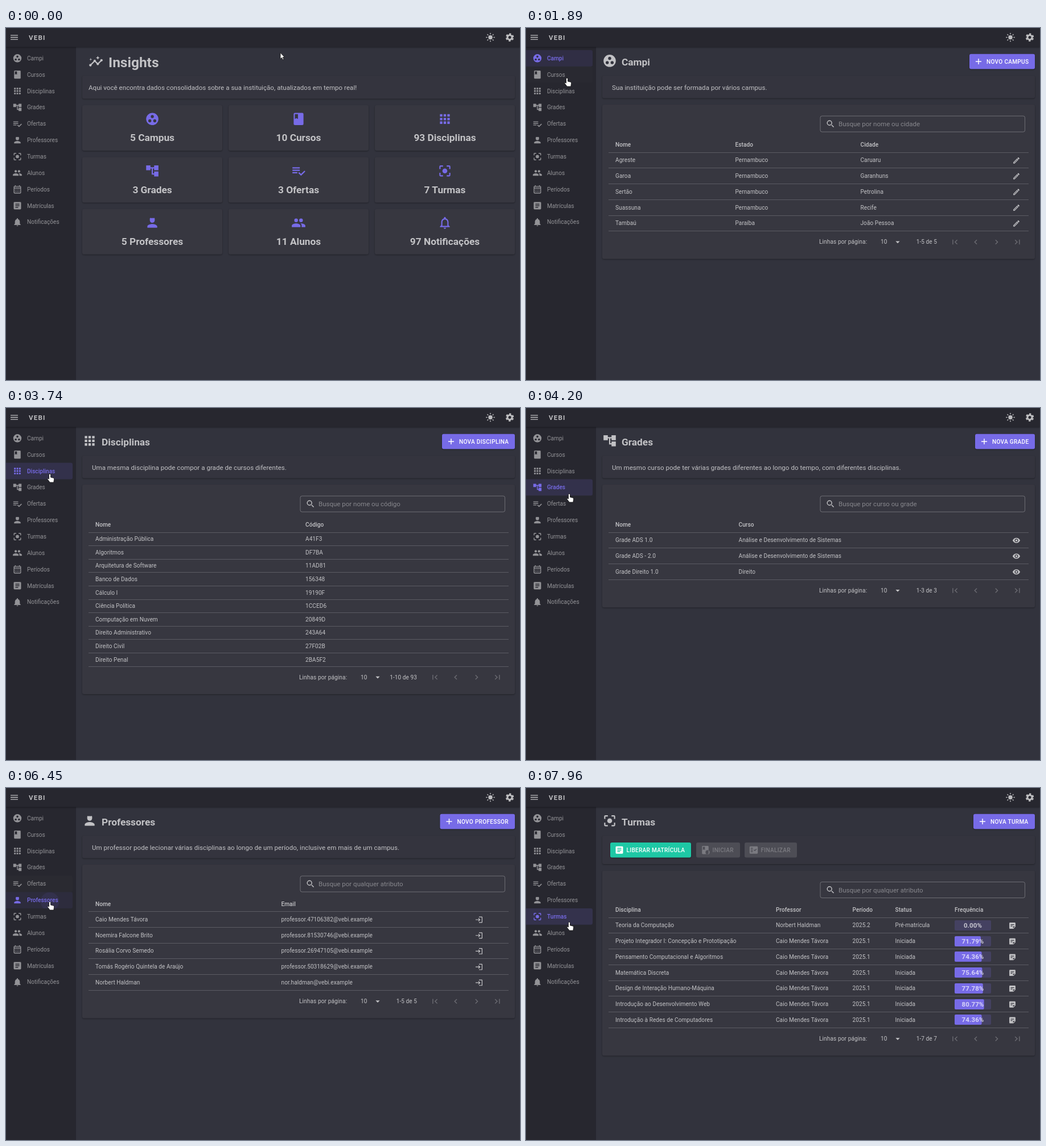
Animation of 903 by 620 pixels, one loop 8000 ms. Source, as an HTML page:

```html
<!DOCTYPE html>
<html lang="pt">
<head>
<meta charset="utf-8">
<style>
html, body { margin: 0; width: 100%; height: 100%; overflow: hidden; background: #32333d; }
svg { display: block; }
text { font-family: Roboto, sans-serif; white-space: pre; }
.card { filter: drop-shadow(0 1px 1px rgba(0, 0, 0, .35)); }
</style>
</head>
<body>
<svg id="stage" width="903" height="620" viewBox="0 0 903 620"></svg>
<script>
const LOOP = 8000;
const INK = 'rgba(255,255,255,.7)', DIM = 'rgba(255,255,255,.5)', FAINT = 'rgba(255,255,255,.26)';
const LINE = 'rgba(255,255,255,.18)', PRIMARY = '#776be7', SURFACE = '#373740', BAR = '#27272f';

const dot = (x, y, r) => `M${x - r} ${y}a${r} ${r} 0 1 0 ${2 * r} 0a${r} ${r} 0 1 0 ${-2 * r} 0z`;
const square = (x, y, s) => `M${x} ${y}h${s}v${s}h${-s}z`;
const three = [0, 1, 2];
const book = 'M18 2H6q-2 0-2 2v16q0 2 2 2h12q2 0 2-2V4q0-2-2-2zM6 4h5v8l-2.5-1.5L6 12z';
const bell = 'M12 22q2 0 2-2h-4q0 2 2 2zm6-6v-5c0-3.07-1.64-5.64-4.5-6.32V4a1.5 1.5 0 0 0-3 0v.68C7.63 5.36 6 7.92 6 11v5l-2 2v1h16v-1z';

const ICONS = {
  campus: dot(12, 12, 10) + dot(12, 8, 2.5) + dot(8, 15, 2.5) + dot(16, 15, 2.5),
  book,
  apps: three.flatMap(i => three.map(j => square(4 + 6 * i, 4 + 6 * j, 4))).join(''),
  tree: 'M22 11V3h-7v3H9V3H2v8h7V8h2v10h4v3h7v-8h-7v3h-2V8h2v3z',
  list: 'M14 10H2v2h12zm0-4H2v2h12zM2 16h8v-2H2zm19.5-4.5L23 13l-7 7-4.5-4.5L13 14l3 3z',
  teacher: 'M12 12a4 4 0 0 0 4-4V5.5a1.5 1.5 0 0 0-2.75-.83 1.5 1.5 0 0 0-2.5 0A1.5 1.5 0 0 0 8 5.5V8a4 4 0 0 0 4 4zm0 2c-2.67 0-8 1.34-8 4v2h16v-2c0-2.66-5.33-4-8-4z',
  focus: dot(12, 12, 4) + 'M5 15H3v4q0 2 2 2h4v-2H5zM5 5h4V3H5q-2 0-2 2v4h2zm14-2h-4v2h4v4h2V5q0-2-2-2zm0 16h-4v2h4q2 0 2-2v-4h-2z',
  people: dot(16, 8, 3) + dot(8, 8, 3) + 'M8 13c-2.33 0-7 1.17-7 3.5V19h14v-2.5c0-2.33-4.67-3.5-7-3.5zm8 0-1 .05c1.2.84 2 1.97 2 3.45V19h6v-2.5c0-2.33-4.67-3.5-7-3.5z',
  calendar: 'M19 4h-1V2h-2v2H8V2H6v2H5q-2 0-2 2v14q0 2 2 2h14q2 0 2-2V6q0-2-2-2zm0 16H5V10h14zm0-12H5V6h14z' +
    [7, 11, 15].map(x => square(x, 12, 2) + square(x, 16, 2)).join(''),
  article: 'M19 3H5q-2 0-2 2v14q0 2 2 2h14q2 0 2-2V5q0-2-2-2zm-5 14H7v-2h7zm3-4H7v-2h10zm0-4H7V7h10z',
  bell,
  bellLine: bell + 'M16 17H8v-6c0-2.48 1.51-4.5 4-4.5s4 2.02 4 4.5z',
  insights: 'M21 8c-1.45 0-2.26 1.44-1.93 2.51l-3.55 3.56h-1.04l-2.55-2.55C12.27 10.45 11.46 9 10 9s-2.27 1.44-1.93 2.52l-4.56 4.55C2.44 15.74 1 16.55 1 18a2 2 0 0 0 2 2c1.45 0 2.26-1.44 1.93-2.51l4.55-4.56h1.04l2.55 2.55C12.73 16.55 13.54 18 15 18s2.27-1.44 1.93-2.52l3.56-3.55C21.56 12.26 23 11.45 23 10a2 2 0 0 0-2-2zM15 9l.94-2.07L18 6l-2.06-.93L15 3l-.92 2.07L12 6l2.08.93zM3.5 11 4 9l2-.5L4 8l-.5-2L3 8l-2 .5L3 9z',
  menu: 'M3 18h18v-2H3zm0-5h18v-2H3zm0-7v2h18V6z',
  plus: 'M19 13h-6v6h-2v-6H5v-2h6V5h2v6h6z',
  search: dot(9.5, 9.5, 6.5) + dot(9.5, 9.5, 4.5) + 'M14 15.5l5 5 1.5-1.5-5-5z',
  edit: 'M14.06 9.02l.92.92L5.92 19H5v-.92zM17.66 3q-.4 0-.7.29l-1.83 1.83 3.75 3.75 1.83-1.83q.6-.7 0-1.41l-2.34-2.34q-.3-.29-.71-.29zm-3.6 3.19L3 17.25V21h3.75L17.81 9.94z',
  eye: 'M12 4.5C7 4.5 2.73 7.61 1 12c1.73 4.39 6 7.5 11 7.5s9.27-3.11 11-7.5c-1.73-4.39-6-7.5-11-7.5z' + dot(12, 12, 5) + dot(12, 12, 3),
  enter: 'M11 7 9.6 8.4l2.6 2.6H2v2h10.2l-2.6 2.6L11 17l5-5zm9 12h-8v2h8q2 0 2-2V5q0-2-2-2h-8v2h8z',
  note: 'M19 3H5q-2 0-2 2v14q0 2 2 2h10l6-6V5q0-2-2-2zM7 8h10v2H7zm5 6H7v-2h5zm2 5.5V14h5.5z',
  start: book + dot(17.5, 17.5, 5),
  check: 'M20 3H4q-2 0-2 2v14q0 2 2 2h16q2 0 2-2V5q0-2-2-2zM10 17H5v-2h5zm0-4H5v-2h5zm0-4H5V7h5zm4.8 6L12 12.2l1.4-1.4 1.4 1.4L18 9l1.4 1.4z',
  down: 'M7 10l5 5 5-5z',
  first: 'M18.4 16.6 13.8 12l4.6-4.6L17 6l-6 6 6 6zM6 6h2v12H6z',
  prev: 'M15.4 7.4 14 6l-6 6 6 6 1.4-1.4-4.6-4.6z',
  next: 'M10 6 8.6 7.4l4.6 4.6-4.6 4.6L10 18l6-6z',
  last: 'M5.6 7.4l4.6 4.6-4.6 4.6L7 18l6-6-6-6zM16 6h2v12h-2z'
};

const icon = (name, x, y, fill = INK, scale = .72) =>
  `<path d="${ICONS[name]}" fill="${fill}" fill-rule="evenodd" transform="translate(${x} ${y}) scale(${scale}) translate(-12 -12)"/>`;
// y is the middle of the capital letters
const text = (x, y, str, { size = 10.08, weight = 400, fill = INK, anchor = 'start', gap = '.006em' } = {}) =>
  `<text x="${x}" y="${y + size * .355}" font-size="${size}" font-weight="${weight}" fill="${fill}" text-anchor="${anchor}" letter-spacing="${gap}">${str}</text>`;
const lead = (x, str) => text(x, 104.7, str, { size: 11.52, gap: '.004em' });
const rect = (x, y, w, h, fill, extra = '') =>
  `<rect x="${x}" y="${y}" width="${w}" height="${h}" fill="${fill}" ${extra}/>`;
const card = (x, y, w, h, fill = SURFACE) => rect(x, y, w, h, fill, 'rx="3" class="card"');
const button = (x, y, w, name, label, fill, ink = '#fff') =>
  (ink === FAINT ? rect(x, y, w, 26.4, fill, 'rx="3"') : card(x, y, w, 26.4, fill)) +
  icon(name, x + 16, y + 13.2, ink) + text(x + (name === 'plus' ? 30 : 28.5), y + 13.2, label, { weight: 500, fill: ink, gap: '.0286em' });

const NAV = [
  ['campus', 'Campi'], ['book', 'Cursos'], ['apps', 'Disciplinas'], ['tree', 'Grades'],
  ['list', 'Ofertas'], ['teacher', 'Professores'], ['focus', 'Turmas'], ['people', 'Alunos'],
  ['calendar', 'Períodos'], ['article', 'Matrículas'], ['bell', 'Notificações']
];
const TOTALS = [
  ['campus', '5 Campus'], ['book', '10 Cursos'], ['apps', '93 Disciplinas'],
  ['tree', '3 Grades'], ['list', '3 Ofertas'], ['focus', '7 Turmas'],
  ['teacher', '5 Professores'], ['people', '11 Alunos'], ['bellLine', '97 Notificações']
];

const ADS = 'Análise e Desenvolvimento de Sistemas', TUTOR = 'Caio Mendes Távora', GUEST = 'Norbert Haldman';
const mail = id => `professor.${id}@vebi.example`;
const started = (name, rate) => [name, TUTOR, '2025.1', 'Iniciada', rate];
const PAGES = [
  { add: 'NOVO CAMPUS', left: 779, info: 'Sua instituição pode ser formada por vários campus.', find: 'nome ou cidade',
    cols: [157, 367.5, 587.5], head: ['Nome', 'Estado', 'Cidade'], action: ['edit', 861.5],
    rows: [['Agreste', 'Pernambuco', 'Caruaru'], ['Garoa', 'Pernambuco', 'Garanhuns'], ['Sertão', 'Pernambuco', 'Petrolina'],
      ['Suassuna', 'Pernambuco', 'Recife'], ['Tambaú', 'Paraíba', 'João Pessoa']] },
  { add: 'NOVO CURSO', left: 786, info: 'Sua instituição pode ofertar diversos tipos de cursos.', find: 'nome ou tipo',
    cols: [157, 526], head: ['Nome', 'Tipo'],
    rows: ['Administração', ADS, 'Arquitetura e Urbanismo', 'Ciência da Computação', 'Ciências Contábeis', 'Direito',
      'Enfermagem', 'Engenharia Civil', 'Pedagogia', 'Psicologia']
      .map(name => [name, name === ADS ? 'Tecnólogo' : name === 'Pedagogia' ? 'Licenciatura' : 'Bacharelado']) },
  { add: 'NOVA DISCIPLINA', left: 766, info: 'Uma mesma disciplina pode compor a grade de cursos diferentes.', find: 'nome ou código',
    cols: [157, 526], head: ['Nome', 'Código'], total: 93, wait: 130,
    rows: ['Administração Pública', 'Algoritmos', 'Arquitetura de Software', 'Banco de Dados', 'Cálculo I', 'Ciência Política',
      'Computação em Nuvem', 'Direito Administrativo', 'Direito Civil', 'Direito Penal']
      .map((name, i) => [name, (0xa41f3 + i * 0x3b5c7).toString(16).toUpperCase()]) },
  { add: 'NOVA GRADE', left: 789, info: 'Um mesmo curso pode ter várias grades diferentes ao longo do tempo, com diferentes disciplinas.', find: 'curso ou grade',
    cols: [157, 373.5], head: ['Nome', 'Curso'], action: ['eye', 861.5],
    rows: [['Grade ADS 1.0', ADS], ['Grade ADS - 2.0', ADS], ['Grade Direito 1.0', 'Direito']] },
  { add: 'NOVA OFERTA', left: 784, info: 'Uma oferta de curso pode acontecer a cada período, com variações de campus, turno e grade.', find: 'qualquer atributo',
    cols: [157, 287.5, 416, 534, 778.5], head: ['Campus', 'Período', 'Turno', 'Curso', 'Grade'],
    rows: [['Agreste', '2025.1', 'Noturno', 'Direito', 'Grade Direito 1.0'], ['Agreste', '2025.1', 'Noturno', ADS, 'Grade ADS 1.0'],
      ['Tambaú', '2025.2', 'Vespertino', ADS, 'Grade ADS 1.0']] },
  { add: 'NOVO PROFESSOR', left: 762.5, info: 'Um professor pode lecionar várias disciplinas ao longo de um período, inclusive em mais de um campus.', find: 'qualquer atributo',
    cols: [157, 483.5], head: ['Nome', 'Email'], action: ['enter', 831], lift: 1.3,
    rows: [[TUTOR, mail(47106382)], ['Noemira Falcone Brito', mail(81530746)], ['Rosália Corvo Semedo', mail(26947105)],
      ['Tomás Rogério Quintela de Araújo', mail(50318629)], [GUEST, 'nor.haldman@vebi.example']] },
  { add: 'NOVA TURMA', left: 786, find: 'qualquer atributo', drop: 10.5, lift: 1.3,
    cols: [157, 439, 573.5, 648.5, 753], head: ['Disciplina', 'Professor', 'Período', 'Status', 'Frequência'], action: ['note', 854.5],
    rows: [['Teoria da Computação', GUEST, '2025.2', 'Pré-matrícula', 0],
      started('Projeto Integrador I: Concepção e Prototipação', 71.79), started('Pensamento Computacional e Algoritmos', 74.36),
      started('Matemática Discreta', 75.64), started('Design de Interação Humano-Máquina', 77.78),
      started('Introdução ao Desenvolvimento Web', 80.77), started('Introdução à Redes de Computadores', 74.36)] }
];

function dashboard() {
  return icon('insights', 158, 59, INK, 1.08) + text(180, 60, 'Insights', { size: 24.48, weight: 600, gap: 0 }) +
    card(134, 84, 760, 40.5, '#34343e') +
    lead(145, 'Aqui você encontra dados consolidados sobre a sua instituição, atualizados em tempo real!') +
    TOTALS.map(([name, label], i) => {
      const x = 134 + (i % 3) * 257, y = 136 + Math.floor(i / 3) * 91.4;
      return card(x, y, 246, 80) + icon(name, x + 123, y + 24.3, PRIMARY, 1.08) +
        text(x + 123, y + 57.3, label, { size: 17.28, weight: 600, anchor: 'middle', gap: 0 });
    }).join('');
}

function rateBar(x, y, rate) {
  const top = Math.round(y) - 9;
  return rect(x, top, 64, 18, PRIMARY, 'rx="2" fill-opacity=".2"') +
    rect(x, top, .64 * rate, 18, PRIMARY, 'rx="2"') +
    text(x + 32, y, rate.toFixed(2) + '%', { size: 11.52, weight: 700, anchor: 'middle', gap: '.01em' });
}

function tablePage(index, loading) {
  const { add, left, info, find, cols, head, rows, action, total, drop = 0, lift = 0 } = PAGES[index];
  const [name, title] = NAV[index];
  const pitch = action ? 27.75 : 23.6, top = 219 + drop - lift;
  const shown = loading ? [] : rows;
  const end = top + (loading ? 2.9 : shown.length * pitch), foot = end + 19;
  const rule = y => rect(145, Math.round(y - .5), 738, 1, LINE);

  let out = icon(name, 147, 57.8, INK, 1.08) + text(168, 59.5, title, { size: 17.28, weight: 600, gap: 0 }) +
    button(left, 45.8, 894 - left, 'plus', add, PRIMARY) +
    card(134, 84, 760, 39.5 + drop, '#34343e') + card(134, 135 + drop, 760, foot + 30 - 135 - drop);
  out += info ? lead(151, info) :
    button(148, 96, 142, 'article', 'LIBERAR MATRÍCULA', '#1ec8a5') +
    button(299, 96, 77, 'start', 'INICIAR', 'rgba(255,255,255,.12)', FAINT) +
    button(384, 96, 92, 'check', 'FINALIZAR', 'rgba(255,255,255,.12)', FAINT);
  out += rect(517, 155 + drop, 359.5, 28, 'none', 'rx="3" stroke="rgba(255,255,255,.3)" stroke-width=".9"') +
    icon('search', 535, 169 + drop) + text(549, 169.3 + drop, 'Busque por ' + find, { size: 11.52, fill: 'rgba(255,255,255,.4)', gap: 0 });

  out += head.map((label, i) => text(cols[i], top - 13.7, label, { weight: 500 })).join('');
  out += loading ? rect(145, top, 738, 2.9, '#3299ff', 'fill-opacity=".35"') + rect(145, top, 0, 2.9, '#3299ff', 'id="progress"') : rule(top);
  shown.forEach((row, r) => {
    const y = top + (r + .5) * pitch - .2;
    out += row.map((cell, i) => typeof cell === 'number' ? rateBar(cols[i], y, cell) : text(cols[i], y, cell)).join('');
    if (action) out += icon(action[0], action[1], y + .6, INK, .6);
    out += rule(top + (r + 1) * pitch);
  });

  const count = shown.length;
  out += text(515, foot, 'Linhas por página:', { gap: '.0107em' }) + text(623, foot, '10') + icon('down', 653, foot + .3) +
    text(722, foot, `${Math.min(1, count)}-${count} de ${loading ? 0 : total || count}`, { anchor: 'end' });
  ['first', 'prev', 'next', 'last'].forEach((arrow, i) => { out += icon(arrow, 753.5 + i * 36.6, foot + .3, FAINT); });
  return out;
}

const navY = i => 53.3 + 28.86 * i;
const rays = Array.from({ length: 8 }, (_, i) => `<path d="M0-7.8v2.4" transform="rotate(${45 * i})"/>`).join('');
stage.innerHTML = `
  <g id="main"></g>
  ${rect(0, 0, 123, 620, BAR)}${rect(0, 0, 903, 33.5, BAR, 'class="card"')}
  ${icon('menu', 14.5, 16.5)}${text(40, 16.5, 'VEBI', { size: 11.52, weight: 600, gap: '1.2px' })}
  <g transform="translate(851 16.5)" stroke="${INK}" stroke-width="1.4"><circle r="3.7" fill="${INK}" stroke="none"/>${rays}</g>
  <g transform="translate(885 16.5) rotate(13.8)" fill="none" stroke="#bebec0">
    <circle r="4" stroke-width="3"/><circle r="6" stroke-width="2.4" stroke-dasharray="3.4 2.883"/></g>
  <clipPath id="row"><rect id="rowBox" width="117" height="28.8" rx="3"/></clipPath>
  ${NAV.map((_, i) => rect(-4, navY(i) - 14.4, 121, 28.8, 'none', 'rx="3" class="back"')).join('')}
  <g clip-path="url(#row)"><circle id="ripple" fill="${PRIMARY}"/></g>
  ${NAV.map(([name, label], i) => `<g class="item">${icon(name, 20, navY(i), 'currentColor')}${text(37, navY(i), label, { fill: 'currentColor', gap: 0 })}</g>`).join('')}
  <path id="cursor" fill="#fff" stroke="#111" stroke-width=".8" stroke-linejoin="round"/>`;

const $ = id => document.getElementById(id);
const backs = document.querySelectorAll('.back'), items = document.querySelectorAll('.item');
const ARROW = 'M0 0v11l2.5-2.3 1.7 3.8 1.8-.8-1.7-3.7H7.5z';
const HAND = 'M-1.5 1.5a1.5 1.5 0 0 1 3 0V6l5 1.2q1.2.4 1.1 2L6.8 15H.2L-4 9.6q-.6-1.5 1-1.5l1.5 1z';

// One visit per menu entry: start of the move, its length, the click and the pointer tip
const VISITS = [
  [120, 730, 930, 48, 55], [1770, 110, 1925, 72, 88], [2920, 80, 2965, 77, 116], [3740, 90, 3800, 76, 151],
  [5260, 80, 5300, 70, 170], [6320, 80, 6380, 77, 200], [7590, 90, 7635, 76, 236]
].map(([at, length, click, x, y]) => ({ at, length, click, x, y, hover: at + length * .6 }));
const clamp = v => Math.max(0, Math.min(1, v));
let shownView;

function pointer(t) {
  const i = VISITS.findLastIndex(v => v.at <= t);
  if (i < 0) return { x: 482, y: 43.5 };
  const to = VISITS[i], from = VISITS[i - 1] || { x: 482, y: 43.5 };
  const p = clamp((t - to.at) / to.length), k = p * p * (3 - 2 * p);
  const arc = i ? 0 : 31 * Math.sin(Math.PI * k);
  return { x: from.x + (to.x - from.x) * k, y: from.y + (to.y - from.y) * k - arc };
}

function draw() {
  const t = performance.now() % LOOP;
  const active = VISITS.findLastIndex(v => v.click <= t);
  const since = active < 0 ? 0 : t - VISITS[active].click;
  const loading = active >= 0 && since < (PAGES[active].wait || 40);
  const view = active + (loading ? ' loading' : '');
  if (view !== shownView) {
    $('main').innerHTML = active < 0 ? dashboard() : tablePage(active, loading);
    shownView = view;
  }
  if (loading) $('progress').setAttribute('width', since * 1.12);

  items.forEach((item, i) => {
    item.style.color = i === active ? PRIMARY : DIM;
    item.querySelector('text').setAttribute('font-weight', i === active ? 500 : 400);
    const visit = VISITS[i], next = VISITS[i + 1];
    const hover = visit ? clamp((t - visit.hover) / 200) * (next ? 1 - clamp((t - next.hover) / 130) : 1) : 0;
    backs[i].setAttribute('fill', i === active ? `rgba(119,107,231,${.07 + .08 * hover * clamp(since / 300)})` : `rgba(255,255,255,${.035 * hover})`);
  });

  const ripple = $('ripple');
  ripple.setAttribute('r', active < 0 ? 0 : since * .23);
  ripple.setAttribute('opacity', .11 * (1 - clamp(since / 350)));
  if (active >= 0) {
    ripple.setAttribute('cx', VISITS[active].x);
    ripple.setAttribute('cy', VISITS[active].y);
    $('rowBox').setAttribute('y', navY(active) - 14.4);
  }

  const { x, y } = pointer(t);
  $('cursor').setAttribute('d', x < 117 && y > 38 ? HAND : ARROW);
  $('cursor').setAttribute('transform', `translate(${x} ${y})`);
  requestAnimationFrame(draw);
}
draw();
</script>
</body>
</html>
```
